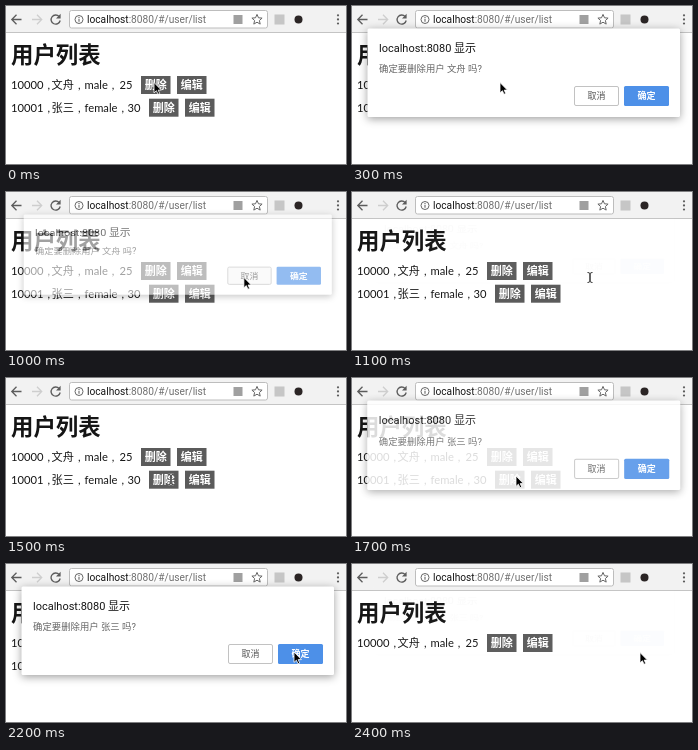
Write an HTML page that moves like this. It is 340 by 158 pixels and loops after 2500 ms.

```html
<!DOCTYPE html>
<html lang="zh-CN">
<head>
<meta charset="utf-8">
<title>用户列表</title>
<style>
  html, body { margin: 0; width: 100%; height: 100%; overflow: hidden; background: #fff; }
  svg { display: block; width: 340px; height: 158px; }
  text { font-family: Lato, "Noto Sans CJK SC", "Noto Sans CJK", sans-serif; font-size: 11px; fill: #151515; }
  .ui { font-family: Roboto, "Noto Sans CJK SC", "Noto Sans CJK", sans-serif; }
  .row { font-size: 11.2px; word-spacing: 1.2px; }
  .mid { text-anchor: middle; }
  .bold { font-weight: 700; }
  #panel { filter: drop-shadow(0 2px 4px rgba(0, 0, 0, .38)); }
</style>
</head>
<body>
<svg viewBox="0 0 340 158">
  <rect width="340" height="158" fill="#fff"/>
  <g id="page">
    <text class="bold" x="5" y="57" style="font-size:22.4px">用户列表</text>
  </g>

  <g id="toolbar">
    <rect width="340" height="26" fill="#f2f2f2"/>
    <path d="M0 26.5H340" stroke="#c4c4c4"/>
    <g fill="none" stroke="#5c5c5c" stroke-width="1.3">
      <path d="M15.5 13.5H6M10.5 8.7 5.8 13.5 10.5 18.3"/>
      <path d="M26 13.5H35.5M31 8.7 35.7 13.5 31 18.3" stroke="#cecece"/>
      <path d="M53.2 10.6A4.6 4.6 0 1 0 54.2 14.5"/>
    </g>
    <path d="M54.6 7.8V12.4H50Z" fill="#5c5c5c"/>
    <rect x="63.5" y="4.5" width="198" height="17.5" rx="2" fill="#fff" stroke="#bdbdbd"/>
    <circle cx="73" cy="13.5" r="4" fill="none" stroke="#666"/>
    <path d="M73 12.7V15.8M73 11V12" stroke="#666" stroke-width="1.1"/>
    <text class="ui" x="81" y="17" style="font-size:10.2px">localhost<tspan fill="#707070">:8080/#/user/list</tspan></text>
    <rect x="227.5" y="9" width="9" height="9" fill="#a0a0a0"/>
    <path d="M251 8.4 252.5 11.8 256.1 12.1 253.4 14.5 254.2 18.1 251 16.2 247.8 18.1 248.6 14.5 245.9 12.1 249.5 11.8Z" fill="none" stroke="#666"/>
    <rect x="268.5" y="8.5" width="10" height="10" fill="#c6c6c6"/>
    <circle cx="292.5" cy="13.5" r="4" fill="#2b2525"/>
    <g fill="#5c5c5c">
      <circle cx="332" cy="9.3" r="1.1"/><circle cx="332" cy="13.4" r="1.1"/><circle cx="332" cy="17.5" r="1.1"/>
    </g>
  </g>

  <g id="dialog">
    <rect id="panel" x="15.5" y="22.5" width="312.5" height="88.5" rx="1.5" fill="#fff"/>
    <text class="ui" x="27" y="46">localhost:8080 显示</text>
    <text class="ui" id="ask" x="27" y="66" style="font-size:9.4px;fill:#666"></text>
    <rect id="cancel" x="222.5" y="80.5" width="44" height="19" rx="1.5" stroke="#c2c2c2"/>
    <text class="mid" x="244.5" y="93.4" style="font-size:9px;fill:#555">取消</text>
    <rect x="272" y="80" width="45" height="20" rx="1.5" fill="#4d90e8"/>
    <text class="mid bold" x="294.5" y="93.4" style="font-size:9px;fill:#fff">确定</text>
  </g>

  <g id="pointer">
    <path id="arrow" d="M0 0V10.4L2.4 8.2 4 11.8 5.7 11 4.2 7.6H7.4Z" fill="#000" stroke="#fff" stroke-width=".8"/>
    <g id="beam" fill="none">
      <path d="M-2.5-5Q0-5 0-3.6V3.6Q0 5-2.5 5M2.5-5Q0-5 0-3.6V3.6Q0 5 2.5 5" stroke="#fff" stroke-width="2" opacity=".6"/>
      <path d="M-2.5-5Q0-5 0-3.6V3.6Q0 5-2.5 5M2.5-5Q0-5 0-3.6V3.6Q0 5 2.5 5" stroke="#333"/>
    </g>
  </g>
</svg>
<script>
const LOOP = 2500, STEP = 100;
const $ = id => document.getElementById(id);
const show = (id, on) => $(id).setAttribute('display', on ? 'inline' : 'none');

const button = (x, y, label) => `
  <rect x="${x}" y="${y}" width="29.5" height="18" fill="#5b5b5b"/>
  <text class="mid bold" x="${x + 14.75}" y="${y + 13}" style="fill:#fff">${label}</text>`;

const row = (id, y, user) => `<g id="${id}">
  <text class="row" x="5" y="${y + 13}">${user.no} ,<tspan x="45.5">${user.name} ,</tspan><tspan x="78.5">${user.sex} ,</tspan><tspan x="${user.ageX}">${user.age}</tspan></text>
  ${button(user.ageX + 21.5, y, '删除')}${button(user.ageX + 57.5, y, '编辑')}</g>`;

const users = [
  { no: 10000, name: '文舟', sex: 'male', age: 25, ageX: 113.5 },
  { no: 10001, name: '张三', sex: 'female', age: 30, ageX: 121.5 }
];
$('page').insertAdjacentHTML('beforeend', users.map((u, i) => row('row' + i, 70 + i * 22.7, u)).join(''));

// Keys are [time, ...values]; values ease between neighbouring keys.
const path = [
  [300, 148, 76.5], [700, 237, 84.5], [1100, 238, 85.5], [1500, 165, 101.5],
  [1600, 164, 98], [1800, 164, 98], [2200, 288, 88], [2400, 288, 88.5]
];

// The dialog pops in with a slight overshoot and folds up towards its top edge.
const popIn = t => [[t - 100, 0, 0], [t, .85, -.05], [t + 100, 1, 0]];
const foldUp = t => [[t - 100, 1, 0], [t, .6, .4], [t + 100, .015, 1], [t + 200, 0, 1]];
const sheet = [...popIn(200), ...foldUp(1000), ...popIn(1700), ...foldUp(2300)];

// Hand-like easing: quick start, longer settling.
function ease(u) {
  const v = u ** .8;
  return v * v * (3 - 2 * v);
}

function at(keys, t) {
  const i = keys.findIndex(k => k[0] >= t);
  if (i < 1) return keys[i ? keys.length - 1 : 0].slice(1);
  const a = keys[i - 1], b = keys[i];
  const e = ease((t - a[0]) / (b[0] - a[0]));
  return a.slice(1).map((v, n) => v + (b[n + 1] - v) * e);
}

function draw(ms) {
  const t = Math.floor(ms % LOOP / STEP) * STEP;
  const [x, y] = at(path, t), [alpha, fold] = at(sheet, t);
  const second = t >= 1500;

  show('row1', t < 2400);
  show('dialog', alpha > 0);
  $('dialog').setAttribute('opacity', alpha);
  $('dialog').setAttribute('transform',
    `translate(172 22) scale(${1 - .035 * fold} ${1 - .23 * fold}) translate(-172 -22)`);
  $('ask').textContent = `确定要删除用户 ${users[+second].name} 吗?`;
  $('cancel').setAttribute('fill', t >= 700 && t <= 1000 ? '#f7f7f7' : '#fff');

  const beam = t >= 1100 && t <= 1500;
  show('beam', beam);
  show('arrow', !beam);
  $('pointer').setAttribute('transform', `translate(${x} ${y})`);
}

const start = performance.now();
function tick() {
  draw(performance.now() - start);
  requestAnimationFrame(tick);
}
tick();
</script>
</body>
</html>
```
